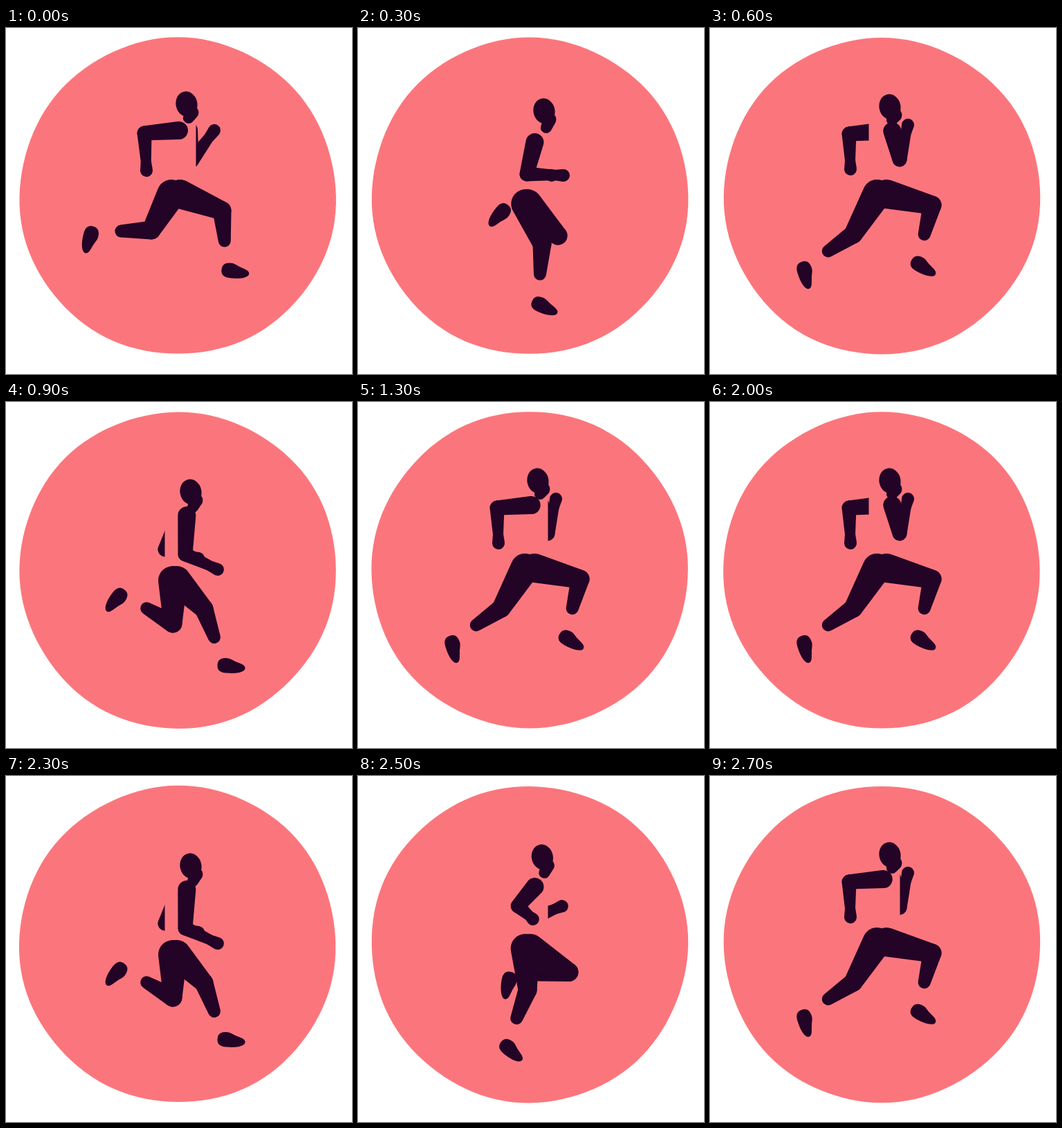
An HTML page with a canvas that plays this animation: 500x500 px, repeating every 2.8 s.

```html
<!DOCTYPE html>
<html lang="en">
<head>
<meta charset="utf-8">
<title>Runner</title>
<style>
  html, body { margin: 0; width: 100%; height: 100%; overflow: hidden; background: #fff; }
  canvas { display: block; width: 100vw; height: 100vh; }
</style>
</head>
<body>
<canvas id="stage" width="500" height="500"></canvas>
<script>
const ctx = document.getElementById('stage').getContext('2d');
const PINK = '#fb767c', DARK = '#230326';
const STEP_MS = 100, DRAWINGS = 28, STRIDE = 14, HALF = 7;
const SHIN = 78, TROUSER = 0.56;

// Each row starts with its time in steps; the rows between are interpolated.
// Body: head x, y, neck drop, shoulder y, hip x, y
const bodyAt = track(HALF, [
  [0, 261, 110, 20, 148, 243, 240],
  [2, 267, 130, 22, 164, 241, 258],
  [3, 269, 120, 24, 165, 239, 254],
  [6, 260, 114, 19, 149, 246, 240]
]);
// Leg: knee x, y, shin angle from straight down, foot angle
const legAt = track(STRIDE, [
  [0, 312, 264, 5, 0],
  [2, 286, 299, 20, -2],
  [3, 266, 312, -4, 16],
  [6, 207, 298, -56, 66],
  [7, 210, 292, -88, 97],
  [9, 241, 320, -120, 120],
  [10, 289, 300, -116, 122],
  [13, 321, 256, -15, 22]
]);
// Arm: elbow x, y, hand x, y
const armAt = track(STRIDE, [
  [0, 200, 152, 203, 206],
  [2, 230, 213, 278, 226],
  [3, 244, 211, 297, 213],
  [6, 274, 190, 286, 140],
  [7, 268, 192, 301, 148],
  [9, 259, 220, 306, 242],
  [10, 247, 206, 280, 213],
  [13, 201, 153, 203, 204]
]);
const shoe = [[-18, -10], [-4, -12], [5, -6], [20, 0], [19, 7], [4, 10], [-19, 7]];

// Smooth closed curve in time through the rows.
function track(period, rows) {
  const n = rows.length;
  const row = i => {
    const [t, ...values] = rows[(i + n) % n];
    return { t: t + Math.floor(i / n) * period, values };
  };
  return time => {
    const t = time % period;
    const i = rows.findLastIndex(r => r[0] <= t);
    const [a, b, c, d] = [row(i - 1), row(i), row(i + 1), row(i + 2)];
    const span = c.t - b.t, u = (t - b.t) / span;
    return b.values.map((p, k) => {
      const q = c.values[k];
      const m = (q - a.values[k]) / (c.t - a.t) * span;
      const w = (d.values[k] - p) / (d.t - b.t) * span;
      return p + u * (m + u * (3 * (q - p) - 2 * m - w + u * (2 * (p - q) + m + w)));
    });
  };
}

const radians = degrees => degrees * Math.PI / 180;
const mix = (a, b, u) => a + (b - a) * u;

// Chain of [x, y, radius] joints with a tapered bone between neighbours.
function limb(...joints) {
  for (let i = 1; i < joints.length; i++) {
    const [[x1, y1, r1], [x2, y2, r2]] = [joints[i - 1], joints[i]];
    const angle = Math.atan2(y2 - y1, x2 - x1);
    const side = Math.acos((r1 - r2) / Math.hypot(x2 - x1, y2 - y1));
    ctx.beginPath();
    ctx.arc(x1, y1, r1, angle + side, angle - side);
    ctx.arc(x2, y2, r2, angle - side, angle + side);
    ctx.fill();
  }
}

function blob(points) {
  const n = points.length;
  const middle = i => {
    const [a, b] = [points[i % n], points[(i + 1) % n]];
    return [mix(a[0], b[0], 0.5), mix(a[1], b[1], 0.5)];
  };
  ctx.beginPath();
  ctx.moveTo(...middle(n - 1));
  for (let i = 0; i < n; i++) ctx.quadraticCurveTo(...points[i], ...middle(i));
  ctx.lineWidth = 2;
  ctx.fill();
  ctx.stroke();
}

function leg(phase, hipX, hipY) {
  const [kneeX, kneeY, shin, turn] = legAt(phase);
  const dx = SHIN * Math.sin(radians(shin)), dy = SHIN * Math.cos(radians(shin));
  limb([mix(hipX, kneeX, 0.12), hipY, 21], [kneeX, kneeY, 13.5],
    [kneeX + dx * TROUSER, kneeY + dy * TROUSER, 9]);
  ctx.save();
  ctx.translate(kneeX + dx, kneeY + dy);
  ctx.rotate(radians(turn));
  ctx.translate(12, 10);
  blob(shoe);
  ctx.restore();
}

function arm(phase, shoulderY) {
  const [elbowX, elbowY, handX, handY] = armAt(phase);
  const shoulderX = 257 - 7 * Math.cos(phase / STRIDE * 2 * Math.PI);
  limb([shoulderX, shoulderY, 13], [elbowX, elbowY, 10.5],
    [mix(elbowX, handX, 0.75), mix(elbowY, handY, 0.75), 7.5], [handX, handY, 9]);
}

function head(x, y, drop) {
  ctx.beginPath();
  ctx.ellipse(x, y, 15.5, 18.5, radians(-12), 0, 2 * Math.PI);
  ctx.fill();
  limb([x + 8, y + 12, 9.5], [x + 3, y + drop, 8]);
}

// Hand-cut disc whose edge shifts a little with each drawing.
function disc(n) {
  ctx.beginPath();
  for (let i = 0; i < 120; i++) {
    const a = i * Math.PI / 60;
    const r = 228.7 + 0.6 * Math.sin(3 * a + n * 2.4) + 0.5 * Math.sin(7 * a + n * 4.1);
    ctx.lineTo(248.2 + r * Math.cos(a), 243 + r * Math.sin(a));
  }
  ctx.fill();
}

function draw(n) {
  const near = n % STRIDE, far = (near + HALF) % STRIDE;
  const [headX, headY, drop, shoulderY, hipX, hipY] = bodyAt(near);
  ctx.fillStyle = '#fff';
  ctx.fillRect(0, 0, 500, 500);
  ctx.fillStyle = PINK;
  disc(n);

  ctx.fillStyle = ctx.strokeStyle = DARK;
  arm(far, shoulderY);
  // The torso shows only by hiding the far arm.
  ctx.fillStyle = PINK;
  ctx.fillRect(229.5, 125, 45, 130);

  ctx.fillStyle = DARK;
  leg(far, hipX, hipY);
  leg(near, hipX, hipY);
  arm(near, shoulderY);
  head(headX, headY, drop);
}

function tick() {
  draw(Math.floor(performance.now() / STEP_MS) % DRAWINGS);
  requestAnimationFrame(tick);
}
tick();
</script>
</body>
</html>
```
